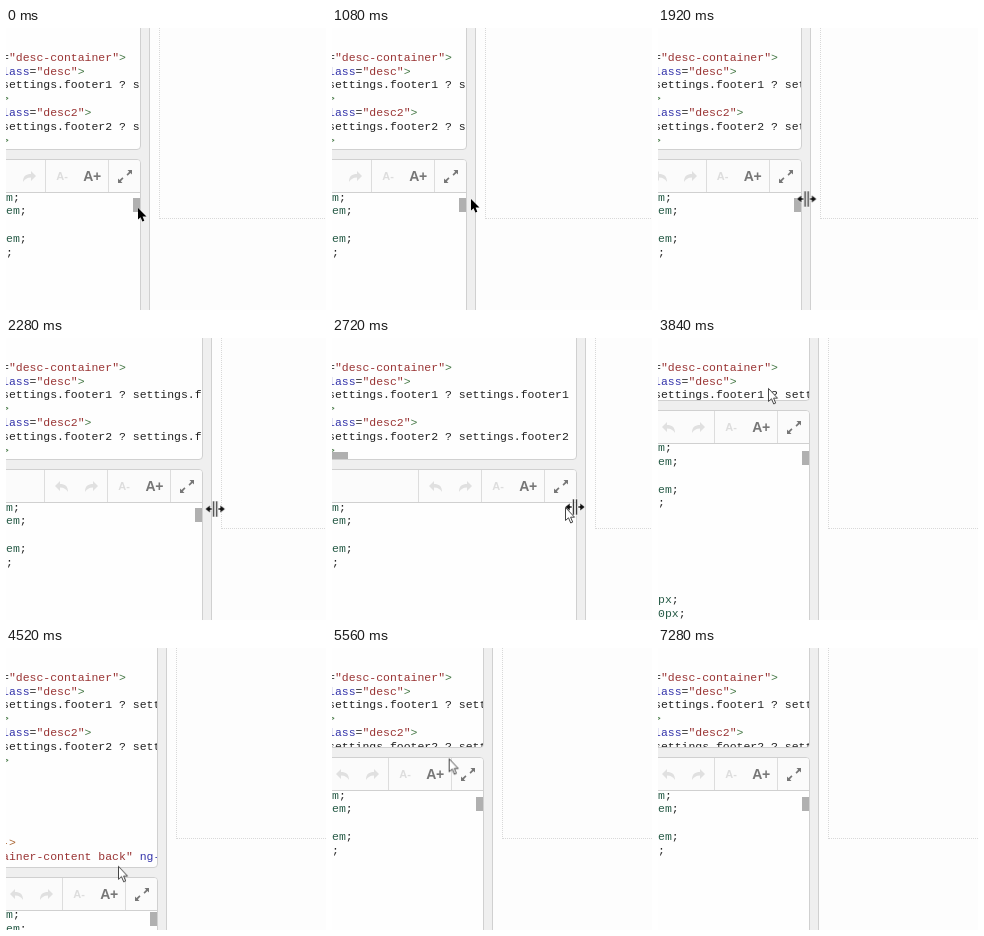
These frames come from a looping animation (320x282 px, 7.36 s). An HTML page:

```html
<!DOCTYPE html>
<html lang="en">
<head>
<meta charset="utf-8">
<title>Resizable editor panes</title>
<style>
/* --r: right edge of the editors, --h: bottom edge of the upper editor */
@property --r { syntax: "<length>"; inherits: true; initial-value: 134px; }
@property --h { syntax: "<length>"; inherits: true; initial-value: 122px; }

html, body { margin: 0; width: 100%; height: 100%; overflow: hidden; }
#stage {
  position: relative; width: 320px; height: 282px; overflow: hidden;
  background: #efefef;
  animation: column 7360ms linear infinite, row 7360ms linear infinite;
}
#stage *, #stage { box-sizing: border-box; }
#stage div, #stage svg { position: absolute; }

.pane {
  left: -10px; width: calc(var(--r) + 11px);
  background: #fefefe; border: 1px solid #d0d0d0; border-radius: 4px;
  overflow: hidden;
}
.upper { top: -10px; height: calc(var(--h) + 10px); }
.lower { top: calc(var(--h) + 9px); height: 300px; }

.code {
  font: 11.47px/13.8px "Liberation Mono", "Courier New", monospace;
  white-space: pre; color: #222; margin: 0;
}
.upper .code { left: 5px; top: 31.8px; }
.lower .code { left: 9px; top: 30.6px; }
.code i { font-style: normal; }
.a { color: #33a; }
.s { color: #933; }
.t { color: #474; }
.c { color: #a63; }
.n { color: #265a46; }

.bar { left: 0; right: 0; top: 0; height: 33px; background: #fbfbfb; border-bottom: 1px solid #d0d0d0; }
.bar .sep { width: 1px; top: 0; height: 32px; background: #ddd; }
.bar .txt { font: bold 11px Arial, "Liberation Sans", sans-serif; line-height: 32px; text-align: center; width: 30px; top: 0; color: #ddd; }
.bar .big { font-size: 14px; letter-spacing: -.5px; color: #777; }

.thumb { background: #b0b0b0; }
.vthumb {
  width: 7px; height: 14px; left: calc(var(--r) - 7px);
  top: calc(var(--h) + 50px - (var(--h) - 63px) * .038);
  animation: vthumb 7360ms step-end infinite;
}
.hthumb {
  left: 0; width: 16px; height: 7px; top: calc(var(--h) - 8px);
  animation: hthumb 7360ms step-end infinite;
}
.preview { left: calc(var(--r) + 9px); top: -1px; width: 340px; height: 290px; background: #fdfdfd; border-left: 1px solid #d0d0d0; }
.sheet { left: calc(var(--r) + 19px); top: -5px; width: 340px; height: 196px; border: 1px dotted #d8d8d8; }

#pointer { left: 0; top: 0; animation: pointer 7360ms linear infinite; }
#pointer svg { left: 0; top: 0; overflow: visible; }
#dark { animation: dark 7360ms step-end infinite; }
#light { animation: light 7360ms step-end infinite; }
#beam {
  left: -10px; top: -9px;
  animation: beam 7360ms linear infinite, beamShow 7360ms step-end infinite;
}

@keyframes column {
  0%, 23.91% { --r: 134px; animation-timing-function: ease-in; }
  30.98% { --r: 196px; }
  33.7% { --r: 237px; animation-timing-function: ease-out; }
  35.33%, 36.1% { --r: 246px; }
  36.96% { --r: 244px; animation-timing-function: ease-in-out; }
  43.48%, 100% { --r: 151px; }
}
@keyframes row {
  0%, 48.91% { --h: 122px; }
  52.17% { --h: 63px; animation-timing-function: ease-out; }
  53.8% { --h: 45px; }
  54.89% { --h: 45px; animation-timing-function: ease-in-out; }
  59.78% { --h: 223px; }
  61.41% { --h: 220px; }
  64.67% { --h: 182px; }
  69.57%, 100% { --h: 100px; }
}
@keyframes pointer {
  0% { transform: translate(132px, 180px); animation-timing-function: ease-in-out; }
  5.98% { transform: translate(122px, 250px); animation-timing-function: ease-in-out; }
  14.4%, 20.2% { transform: translate(139px, 171px); }
  36.4% { transform: translate(241px, 169px); }
  36.96% { transform: translate(233px, 169px); animation-timing-function: ease-in-out; }
  43.8% { transform: translate(143px, 165px); animation-timing-function: ease-in-out; }
  48.4% { transform: translate(110px, 125px); }
  52.17% { transform: translate(110px, 50px); }
  53.8% { transform: translate(110px, 42px); }
  54.89% { transform: translate(111px, 45px); animation-timing-function: ease-in-out; }
  59.5% { transform: translate(112px, 225px); }
  61.41% { transform: translate(112px, 218px); }
  64.67% { transform: translate(112px, 180px); }
  69.57%, 75.3% { transform: translate(112px, 104px); }
  78% { transform: translate(161px, 170px); }
  79.8% { transform: translate(140px, 218px); }
  83.1%, 100% { transform: translate(-16px, 205px); }
}
@keyframes beam {
  0%, 23.91% { transform: translate(139px, 171px); animation-timing-function: ease-in; }
  30.98% { transform: translate(209px, 171px); }
  33.7% { transform: translate(246px, 170px); }
  34.8% { transform: translate(253px, 169px); }
  36.96%, 100% { transform: translate(243px, 169px); }
}
@keyframes dark { 0% { opacity: 1; } 20.1%, 100% { opacity: 0; } }
@keyframes beamShow { 0% { opacity: 0; } 20.1% { opacity: 1; } 37.3%, 100% { opacity: 0; } }
@keyframes light { 0% { opacity: 0; } 36.8% { opacity: 1; } 83.1%, 100% { opacity: 0; } }
@keyframes vthumb { 0% { opacity: 1; } 34.7% { opacity: 0; } 37.9%, 100% { opacity: 1; } }
@keyframes hthumb { 0% { opacity: 0; } 34.7% { opacity: 1; } 37.9%, 100% { opacity: 0; } }
</style>
</head>
<body>
<div id="stage">
  <div class="preview"></div>
  <div class="sheet"></div>

  <div class="pane upper">
    <div class="code">=<i class="s">"desc-container"</i><i class="t">&gt;</i>
<i class="a">lass</i>=<i class="s">"desc"</i><i class="t">&gt;</i>
settings.footer1 ? settings.footer1 : ''
<i class="t">&gt;</i>
<i class="a">lass</i>=<i class="s">"desc2"</i><i class="t">&gt;</i>
settings.footer2 ? settings.footer2 : ''
<i class="t">&gt;</i>





<i class="c">-&gt;</i>
<i class="s">ainer-content back"</i> <i class="a">ng-show</i></div>
  </div>

  <div class="pane lower">
    <div class="bar">
      <div class="sep" style="right:157px"></div>
      <div class="sep" style="right:94px"></div>
      <div class="sep" style="right:31px"></div>
      <svg width="13" height="11" style="right:134px;top:11px"><path id="bend" fill="#e0e0e0" d="M0 5L5 0V3C10 3 13 5 13 11C11 8 9 6.500 5 6.500V10Z"/></svg>
      <svg width="13" height="11" style="right:104px;top:11px"><use href="#bend" transform="matrix(-1 0 0 1 13 0)"/></svg>
      <div class="txt" style="right:63px">A-</div>
      <div class="txt big" style="right:33px">A+</div>
      <svg width="14" height="13" style="right:8px;top:10px" fill="#777"><path id="corner" d="M14 0V4.500L12.500 3L9.600 5.700L8.500 4.600L11.200 1.700L9.500 0Z"/><use href="#corner" transform="rotate(180 7 6.500)"/></svg>
    </div>
    <div class="code"><i class="n">m</i>;
<i class="n">em</i>;

<i class="n">em</i>;
;






<i class="n">px</i>;
<i class="n">0px</i>;</div>
  </div>

  <div class="thumb vthumb"></div>
  <div class="thumb hthumb"></div>

  <svg id="beam" width="20" height="18">
    <path fill="#111" stroke="#fff" stroke-width=".6" d="M7.500 1H9.200V17H7.500ZM10.800 1H12.500V17H10.800ZM0 9L5 5V8H7V10H5V13ZM20 9L15 5V8H13V10H15V13Z"/>
  </svg>
  <div id="pointer">
    <svg id="dark" width="9" height="14"><path fill="#000" d="M0 0V11.500L2.600 9.200L4.400 13.500L6.300 12.700L4.600 8.600H8.500Z"/></svg>
    <svg id="light" width="12" height="19"><path fill="#fff" stroke="#444" d="M.5 .5V13.500L3.500 10.800L5.700 16L7.700 15.100L5.600 10.200H9.500Z"/></svg>
  </div>
</div>
</body>
</html>
```
